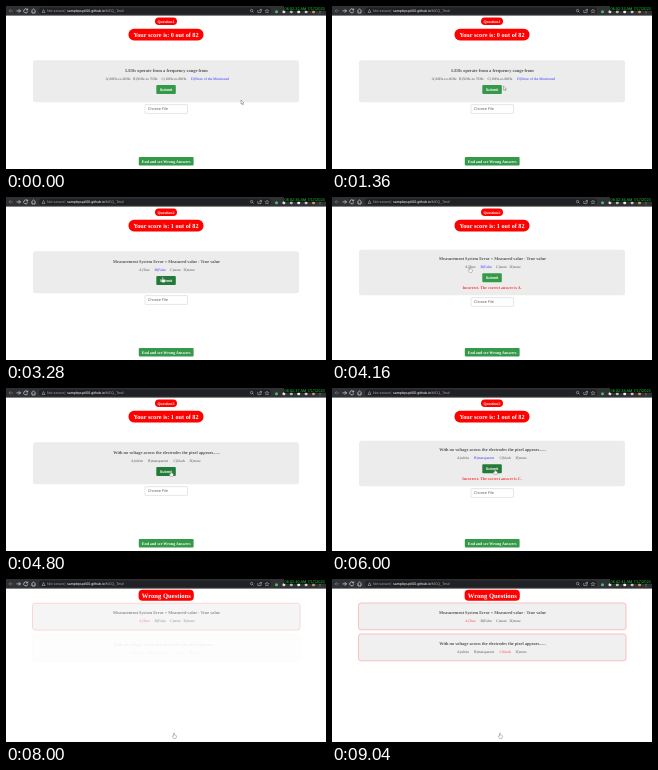
An HTML page that plays this animation: 320 px wide and 163 px high, repeating every 9200 ms.

```html
<!DOCTYPE html>
<html lang="en">
<head>
<meta charset="utf-8">
<title>Quiz</title>
<style>
html, body { margin: 0; width: 100%; height: 100%; overflow: hidden; background: #fff; }
svg { display: block; width: 100%; height: 100%; }
text { font-family: "Liberation Serif", serif; text-rendering: geometricPrecision; white-space: pre; }
.sans { font-family: "Liberation Sans", sans-serif; }
.bold { font-weight: bold; }
.mid { text-anchor: middle; }
</style>
</head>
<body>
<svg id="stage" viewBox="0 0 320 163"></svg>
<script>
const LOOP = 9200;
const stage = document.getElementById("stage");
const GREEN = "#35994a", DARK_GREEN = "#247a38", INK = "#555";

function add(parent, tag, attrs = {}, content) {
  const node = document.createElementNS("http://www.w3.org/2000/svg", tag);
  for (const key in attrs) node.setAttribute(key, attrs[key]);
  if (content !== undefined) node.textContent = content;
  return parent.appendChild(node);
}
const group = parent => add(parent, "g");
const box = (parent, x, y, width, height, rx, fill, extra) =>
  add(parent, "rect", { x, y, width, height, rx, fill, ...extra });
const label = (parent, x, y, size, fill, style, content) =>
  add(parent, "text", { x, y, "font-size": size, fill, class: style }, content);
const line = (parent, d, stroke, width = 0.7) =>
  add(parent, "path", { d, stroke, "stroke-width": width, fill: "none" });
const show = (node, on) => node.setAttribute("display", on ? "inline" : "none");
const move = (node, x, y) => node.setAttribute("transform", `translate(${x} ${y})`);

const questions = [
  { text: "LEDs operate from a frequency range from", size: 4.46, xs: [99.5, 127, 155.5, 185],
    options: ["A)10Hz-to-60Hz", "B)50Hz-to 70Hz", "C)10Hz-to-80Hz", "D)None of the Mentioned"] },
  { text: "Measurement System Error = Measured value - True value", size: 4.26, xs: [133, 148.5, 164, 177.5],
    options: ["A)True", "B)False", "C)none", "D)none"], answer: 0 },
  { text: "With no voltage across the electrodes the pixel appears......", size: 4.3, xs: [125, 142, 167.5, 183.5],
    options: ["A)white", "B)transparent", "C)black", "D)none"], answer: 2 }
];

function drawQuestion(parent, question, y) {
  label(parent, 160.5, y, question.size, INK, "bold mid", question.text);
  return question.options.map((option, i) =>
    label(parent, question.xs[i], y + 8.2, 3.7, INK, "", option));
}

// Quiz page
const quiz = group(stage);
box(quiz, 149, 11.4, 22, 7.6, 3.8, "#f00");
const number = label(quiz, 160, 16.5, 3.9, "#fff", "bold mid");
box(quiz, 122.5, 22.8, 75, 11.6, 5.5, "#f00");
const score = label(quiz, 160, 30.7, 6.2, "#fff", "bold mid");
const card = box(quiz, 27, 54.3, 266, 42, 2.5, "#ececec");
const content = group(quiz);
const sheets = questions.map(question => {
  const node = group(content);
  return { node, options: drawQuestion(node, question, 65.8) };
});
const submit = box(content, 150.3, 79, 19.5, 9, 1, GREEN);
label(content, 160.1, 84.8, 3.7, "#fff", "sans bold mid", "Submit");
const message = label(quiz, 160, 91.8, 4, "#f33", "bold mid");
const upload = group(quiz);
box(upload, 139, 98.6, 42.5, 8.8, 0.6, "#fff", { stroke: "#ccc", "stroke-width": 0.5 });
label(upload, 141.7, 104.4, 3.8, "#666", "sans", "Choose File");
const finish = box(quiz, 132.8, 151, 54.8, 8.6, 1, GREEN);
label(quiz, 160.2, 156.6, 4, "#fff", "bold mid", "End and see Wrong Answers");

// Review page
const review = group(stage);
box(review, 132.6, 10.8, 55.2, 11, 4, "#f00");
label(review, 160.3, 18.5, 6.6, "#fff", "bold mid", "Wrong Questions");
const wrongCards = [1, 2].map((index, row) => {
  const node = group(review), y = 24 + row * 31;
  box(node, 26.5, y, 267.5, 26.8, 2.5, "#f0f0f0", { stroke: "#f9aaaa", "stroke-width": 0.7 });
  const options = drawQuestion(node, questions[index], y + 10.8);
  options[questions[index].answer].setAttribute("fill", "#f44");
  return node;
});

// Browser toolbar
const bar = group(stage);
box(bar, 0, 0, 320, 9.6, 0, "#303135");
box(bar, 33, 1.6, 232, 6.6, 3.3, "#202124");
line(bar, "M7 4.9H3M4.7 3.2L3 4.9L4.7 6.6", "#777");
line(bar, "M10.5 4.9H14.5M12.8 3.2L14.5 4.9L12.8 6.6", "#ddd");
line(bar, "M21.3 3.6A2 2 0 1 0 21.7 5.4M21.7 2.6V4H20.3", "#ddd");
line(bar, "M25.3 5L27.5 3L29.7 5M26 4.8V7H29V4.8", "#ddd");
line(bar, "M36 6.5H39L37.5 3.5Z", "#bbb", 0.5);
label(bar, 41, 6.3, 3.6, "#aaa", "sans", "Not secure");
line(bar, "M59 3V7", "#666", 0.4);
const address = label(bar, 61, 6.3, 3.6, "#fff", "sans", "samplepupil00.github.io");
add(address, "tspan", { fill: "#aaa" }, "/MCQ_Test/");
add(bar, "circle", { cx: 245.6, cy: 4.6, r: 1.2, fill: "none", stroke: "#ccc", "stroke-width": 0.5 });
line(bar, "M246.4 5.4L247.6 6.6M251.8 4V6.6H255V5M253 5L255.4 3.4H253.8M255.4 3.4V5", "#ccc", 0.5);
line(bar, "M261 3L261.6 4.4L263 4.5L262 5.5L262.3 7L261 6.2L259.7 7L260 5.5L259 4.5L260.4 4.4Z", "#ccc", 0.4);
["#5b6", "#ddd", "#bbb", "#eee", "#ccc", "#c95"].forEach((fill, i) =>
  add(bar, "circle", { cx: 270.5 + i * 7.4, cy: 5.8, r: 1.5, fill }));
for (let y = 3.6; y < 8; y += 1.7) add(bar, "circle", { cx: 314, cy: y, r: 0.45, fill: "#ddd" });
box(bar, 278, 0, 42, 4.6, 0, "#000");
const clock = label(bar, 278.5, 3.8, 3.9, "#1fe03a", "sans", "");

// Pointers
const arrow = add(stage, "path", { d: "M0 0V4.2L1 3.3L1.7 4.8L2.4 4.5L1.7 3.1H3Z",
  fill: "#fff", stroke: "#555", "stroke-width": 0.4 });
const hand = add(stage, "path", {
  d: "M-.5 .2Q0 -.5 .5 .2V2L2 2.4Q2.7 2.6 2.5 3.5L2 5.4H-.6L-1.8 3.2Q-1.6 2.3 -.5 3.2Z",
  fill: "#fff", stroke: "#555", "stroke-width": 0.35 });

// Pointer stops: time, x, y
const path = [
  [0, 235, 94], [80, 235, 94], [560, 203, 73], [720, 203, 73], [880, 197, 75],
  [1040, 197, 75], [1600, 155, 83], [2400, 155, 83], [2640, 155, 83], [2960, 153, 72],
  [3120, 153, 72], [3360, 158, 83], [3680, 158, 83], [4000, 138, 70], [4240, 138, 70],
  [4640, 165, 83], [5040, 165, 83], [5360, 157, 72], [5680, 157, 72], [5840, 163, 81],
  [6240, 163, 81], [6480, 173, 71], [6560, 173, 71], [6720, 164, 79.6], [7120, 164, 79.6],
  [7440, 168, 154], [LOOP, 168, 154]
];
const ease = p => p * p * (3 - 2 * p);
const ramp = (t, start, end) => ease(Math.min(1, Math.max(0, (t - start) / (end - start))));

function pointerAt(t) {
  const i = path.findIndex(stop => stop[0] > t);
  const [t0, x0, y0] = path[i - 1], [t1, x1, y1] = path[i];
  const p = ramp(t, t0, t1);
  return [x0 + (x1 - x0) * p, y0 + (y1 - y0) * p];
}

// Quiz states: start time, question, selected option, error letter
const states = [
  [0, 0, 3, ""], [2000, 1, -1, ""], [3040, 1, 1, ""], [3360, 1, 1, "A"], [4240, 1, 0, "A"],
  [4640, 2, -1, ""], [5360, 2, 1, ""], [5840, 2, 1, "C"], [6500, 2, 2, "C"], [6960, 2, 2, ""]
];
const REVIEW_START = 7520;

function render(t) {
  const [, current, selected, error] = states.findLast(state => state[0] <= t);
  const reviewing = t >= REVIEW_START;
  const [x, y] = pointerAt(t);
  const lift = error ? 2.8 : 0;
  const inside = (left, top, right, bottom) => x >= left && x <= right && y >= top && y <= bottom;
  const onSubmit = inside(150, 79 - lift, 170, 88 - lift), onFinish = inside(132, 151, 188, 160);
  const onOption = inside(99, 70 - lift, 224, 76 - lift);

  show(quiz, !reviewing);
  show(review, reviewing);
  sheets.forEach((sheet, i) => {
    show(sheet.node, i === current);
    sheet.options.forEach((option, k) =>
      option.setAttribute("fill", i === current && k === selected ? "#33f" : INK));
  });
  number.textContent = "Question" + (current + 1);
  score.textContent = `Your score is: ${current ? 1 : 0} out of 82`;

  // An error line makes the centred card taller in both directions
  message.textContent = error && `Incorrect. The correct answer is ${error}.`;
  card.setAttribute("y", error ? 52.7 : 54.3);
  card.setAttribute("height", error ? 45.6 : 42);
  move(content, 0, -lift);
  move(upload, 0, error ? 2 : 0);
  submit.setAttribute("fill", onSubmit ? DARK_GREEN : GREEN);
  finish.setAttribute("fill", onFinish ? DARK_GREEN : GREEN);

  wrongCards.forEach((node, i) => {
    const p = ramp(t, REVIEW_START + i * 320, 8320 + i * 480);
    node.setAttribute("opacity", p);
    move(node, 0, (1 - p) * 0.8);
  });

  clock.textContent = `06:02:${Math.floor(32.25 + t / 1000)} AM 7/17/2023`;
  const pointing = reviewing || onSubmit || onFinish || onOption;
  show(hand, pointing);
  show(arrow, !pointing);
  move(pointing ? hand : arrow, x, y);
}

const start = performance.now();
function tick() {
  render((performance.now() - start) % LOOP);
  requestAnimationFrame(tick);
}
tick();
</script>
</body>
</html>
```
